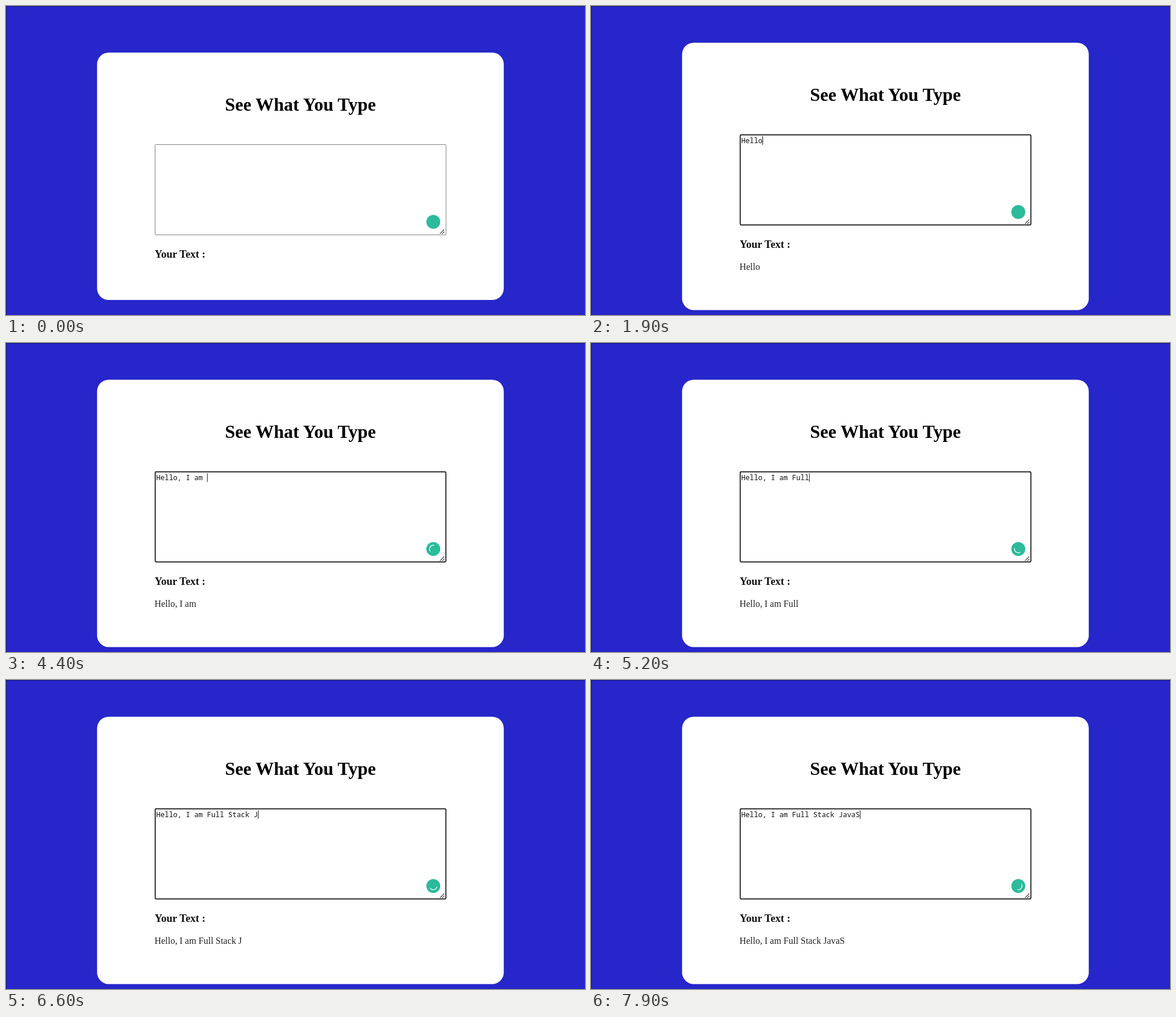
An HTML page for the animation above (8 s loop, 1000 px wide and 534 px high).

```html
<!DOCTYPE html>
<html lang="en">
<head>
<meta charset="utf-8">
<title>See What You Type</title>
<style>
  html, body { margin: 0; width: 100%; height: 100%; overflow: hidden; background: #2626ca; }
  svg { display: block; width: 100%; height: 100%; }
  text { font-family: "Liberation Serif", "Times New Roman", serif; white-space: pre; }
  .title { font-size: 31.5px; font-weight: bold; text-anchor: middle; }
  .label { font-size: 18.4px; font-weight: bold; fill: #111; }
  .echo { font-size: 15.9px; fill: #222; }
  .typed { font: 12.2px "Noto Sans Mono", monospace; fill: #111; }
  .grip { stroke: #444; stroke-width: 1.1; }
</style>
</head>
<body>
<svg viewBox="0 0 1000 534">
  <rect width="1000" height="534" fill="#2626ca"/>
  <path d="M0 .5H1000M.5 0V534" stroke="#15156f"/>
  <rect id="card" x="157.3" width="702.4" rx="20" fill="#fff"/>
  <g id="content">
    <text class="title" x="508.5" y="164.3">See What You Type</text>
    <rect id="field" fill="#fff"/>
    <path class="grip" d="M749.5 376.5L757 369M753.5 376.5L757 373" fill="none"/>
    <circle cx="738" cy="356" r="12" fill="#2bbb9b"/>
    <path id="spinner" d="M-6.1 -2.2A6.5 6.5 0 0 1 6.1 -2.2" fill="none" stroke="#fff" stroke-width="1.2"/>
    <text class="label" x="256.8" y="418">Your Text :</text>
  </g>
  <text id="typed" class="typed" x="259.5" y="236.8"></text>
  <rect id="caret" y="225" width="1" height="15" fill="#111"/>
  <text id="echo" class="echo" x="256.6" y="456"></text>
</svg>
<script>
  const LOOP = 8000, STEP = 100, CHAR_WIDTH = 7.32, BLINK = 500;
  const FOCUS_AT = 500, SPIN_AT = 2800;
  const message = "Hello, I am Full Stack JavaS";
  const keyTimes = [
    1200, 1500, 1600, 1700, 1900, 2500, 2900, 3000, 3200, 3300, 3500,
    4000, 4500, 4700, 4900, 5100, 5400, 5600, 5800, 5900, 6000, 6200,
    6400, 6500, 6900, 7100, 7300, 7700
  ];
  // time, rotation in degrees
  const spin = [[2800, -237], [3500, 0], [5200, 575], [6600, 890], [7900, 1205], [8000, 1229]];

  const byId = id => document.getElementById(id);
  const [card, content, field, spinner, typed, caret, echo] =
    ["card", "content", "field", "spinner", "typed", "caret", "echo"].map(byId);

  function setAttributes(element, values) {
    for (const name in values) element.setAttribute(name, values[name]);
  }

  function spinAngle(time) {
    const next = Math.max(1, spin.findIndex(([at]) => at > time));
    const [t0, a0] = spin[next - 1], [t1, a1] = spin[next];
    return a0 + (a1 - a0) * (time - t0) / (t1 - t0);
  }

  function draw(time) {
    const count = keyTimes.filter(at => at <= time).length;
    const focused = time >= FOCUS_AT;
    const filled = count > 0;
    const shift = filled ? 0 : 17;

    setAttributes(card, filled ? { y: 63.4, height: 462 } : { y: 80.6, height: 427.4 });
    content.setAttribute("transform", `translate(0 ${shift})`);
    setAttributes(field, focused
      ? { x: 257.7, y: 222.7, width: 502, height: 155.6, rx: 1.5, stroke: "#101010", "stroke-width": 1.7 }
      : { x: 257.5, y: 222.5, width: 502.5, height: 156, rx: 1, stroke: "#808080", "stroke-width": 1 });

    typed.textContent = echo.textContent = message.slice(0, count);

    const lastKey = filled ? keyTimes[count - 1] : FOCUS_AT;
    const caretOn = focused && Math.floor((time - lastKey) / BLINK) % 2 === 0;
    setAttributes(caret, {
      x: 259.5 + count * CHAR_WIDTH,
      y: 225 + shift,
      visibility: caretOn ? "visible" : "hidden"
    });

    const spinning = time >= SPIN_AT;
    spinner.setAttribute("visibility", spinning ? "visible" : "hidden");
    if (spinning) spinner.setAttribute("transform", `translate(738 356) rotate(${spinAngle(time)})`);
  }

  const start = performance.now();
  function tick() {
    const time = (performance.now() - start) % LOOP;
    draw(Math.floor(time / STEP) * STEP);
    requestAnimationFrame(tick);
  }
  tick();
</script>
</body>
</html>
```
